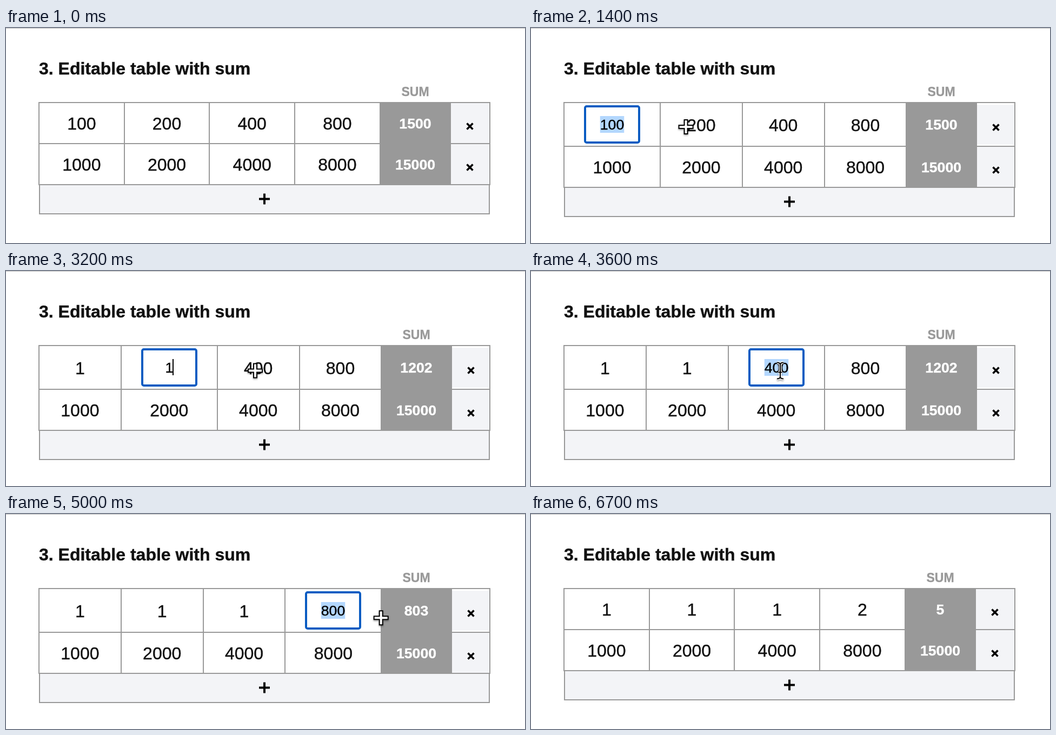
An HTML page that plays this animation: 960 px wide and 398 px high, repeating every 8 s.

```html
<!DOCTYPE html>
<html lang="en">
<head>
<meta charset="utf-8">
<title>Editable table with sum</title>
<style>
  html, body { margin: 0; width: 100%; height: 100%; overflow: hidden; background: #fff; }
  svg { display: block; font-family: "Liberation Sans", Arial, sans-serif; }
  text { fill: #111; stroke: #111; stroke-width: .4px; }
  .mid { text-anchor: middle; }
  .cell { font-size: 32px; }
  .field { font-size: 26.67px; fill: #000; stroke: #000; }
  .sum { font-size: 26.67px; font-weight: 700; fill: #fff; stroke: #fff; }
  .head { font-size: 23px; font-weight: 700; fill: #999; stroke: #999; }
  .title { font-size: 32px; font-weight: 700; }
  .line { fill: none; stroke: #000; }
  .halo { fill: none; stroke: #fff; }
  .cursor { filter: drop-shadow(0 2px 1.5px rgba(0, 0, 0, .35)); }
</style>
</head>
<body>
<svg id="stage" width="960" height="398" viewBox="0 0 960 398"></svg>
<script>
const LOOP = 8000, STEP = 100, BLINK = 500, CLOSE = 6700;
const LINE = '#999', PALE = '#f3f4f7', BLUE = '#0a5cc2', SELECT = '#b3d7fe';

// One edit per column: pointer leaves and arrives, field opens, digit is typed
const edits = [
  { leave: 0, arrive: 600, open: 1000, type: 2000, value: 1 },
  { leave: 1000, arrive: 1700, open: 2200, type: 3100, value: 1 },
  { leave: 2500, arrive: 3200, open: 3400, type: 4000, value: 1 },
  { leave: 4200, arrive: 4600, open: 4900, type: 5800, value: 2 }
];
const exit = { leave: 4900, arrive: 5600 };

const glides = [
  ...edits.map((e, i) => ({ ...e, x: 159 + 151 * i, y: 181 + 1.2 * i })),
  { ...exit, x: 896, y: 208 }
];
const entry = { x: -60, y: 228 };

const rect = (x, y, w, h, fill, more = '') =>
  `<rect x="${x}" y="${y}" width="${w}" height="${h}" fill="${fill}" ${more}/>`;
const text = (x, y, s, type) => `<text x="${x}" y="${y}" class="${type}">${s}</text>`;
const stroke = (d, width, type = 'line') =>
  `<path class="${type}" stroke-width="${width}" d="${d}"/>`;
const total = list => list.reduce((a, b) => a + b);
const easeOut = k => 1 - (1 - k) ** 2.2;

const beam = 'M-6-15Q0-15 0-11Q0-15 6-15M0-11V11M-6 15Q0 15 0 11Q0 15 6 15M-3.5 3H3.5';
const shapes = {
  arrow: '<path d="M0 0V26L6 20.5L10 30L14.5 28L10.5 19H18Z" stroke="#fff" stroke-width="2"/>',
  cell: stroke('M-14 0H14M0-14V14', 8) + stroke('M-12 0H12M0-12V12', 4, 'halo'),
  beam: stroke(beam, 5, 'halo') + stroke(beam, 2)
};

function pointer(t, field) {
  if (t > exit.arrive) return '';
  const i = glides.findLastIndex(g => t >= g.leave);
  const to = glides[i], from = glides[i - 1] || entry;
  const k = easeOut(Math.min(1, (t - to.leave) / (to.arrive - to.leave)));
  const x = from.x + (to.x - from.x) * k, y = from.y + (to.y - from.y) * k;
  let kind = x > 61 && x < 823 ? 'cell' : 'arrow';
  if (field && Math.abs(x - field) < 52) kind = 'beam';
  return `<g class="cursor" transform="translate(${x} ${y + 1})">${shapes[kind]}</g>`;
}

function input(mid, value, edit, t) {
  const w = String(value).length * 26.67 * .556;
  const typed = t >= edit.type;
  let s = rect(mid - 50, 145, 100, 67, '#fff', `rx="3" stroke="${BLUE}" stroke-width="4"`);
  if (!typed) s += rect(mid - w / 2, 163, w, 31, SELECT);
  s += text(mid, 187.5, value, 'field mid');
  if (typed && Math.floor((t - edit.type) / BLINK) % 2 === 0)
    s += rect(Math.round(mid + w / 2 - 1), 163, 2, 30, '#000');
  return s;
}

function draw(t) {
  const active = t < CLOSE ? edits.findLastIndex(e => t >= e.open) : -1;
  const open = active >= 0;
  const first = edits.map((e, i) => t >= e.type ? e.value : 100 * 2 ** i);
  const second = edits.map((e, i) => 1000 * 2 ** i);

  const cols = [61];
  for (let i = 0; i < 4; i++)
    cols.push(cols[i] + (!open ? 157.67 : i === active ? 178 : 151.8));
  const mids = edits.map((e, i) => (cols[i] + cols[i + 1]) / 2);
  const mid = open ? 219 : 214, low = mid + 76;
  const grey = open ? 693 : 691, side = grey + 132;
  const sumX = grey + 66, closeX = open ? 860 : 858;

  let s = rect(0, 0, 960, 1, '#bdbdbd') +
    text(61, 86, '3. Editable table with sum', 'title') +
    text(sumX, 126, 'SUM', 'head mid');

  // Add-row bar
  s += rect(62, low, 832, 54, PALE, `stroke="${LINE}" stroke-width="2"`) +
    stroke(`M468 ${low + 26.5}h20m-10-10v20`, 4);

  // Table body
  s += rect(61, 138, 834, low - 138, '#fff', `stroke="${LINE}" stroke-width="2"`);
  s += open ? rect(side, 142, 69, 74, PALE) : rect(side, 139, 71, 74, PALE);
  s += rect(side, mid + 1, open ? 69 : 71, 74, PALE);
  s += rect(61, mid - 1, 834, 2, LINE);
  for (const x of cols.slice(1, 4)) s += rect(Math.round(x) - 1, 138, 2, low - 138, LINE);
  s += rect(grey, 137, 132, low - 136, LINE);

  // Values, sums and remove marks
  mids.forEach((x, i) => {
    s += i === active ? input(Math.round(x), first[i], edits[i], t)
                      : text(x, open ? 191 : 188, first[i], 'cell mid');
    s += text(x, mid + 50, second[i], 'cell mid');
  });
  s += text(sumX, open ? 187.5 : 185.5, total(first), 'sum mid') +
    text(sumX, mid + 47.5, total(second), 'sum mid');
  for (const y of [open ? 184 : 182, mid + 44])
    s += stroke(`M${closeX - 5.5} ${y - 5.5}l11 11m0-11l-11 11`, 3.6);

  return s + pointer(t, open ? mids[active] : 0);
}

const stage = document.getElementById('stage');
const began = performance.now();
let shown = -1;
function frame() {
  const now = Math.max(0, performance.now() - began) % LOOP;
  const t = Math.floor(now / STEP) * STEP;
  if (t !== shown) stage.innerHTML = draw(shown = t);
  requestAnimationFrame(frame);
}
frame();
</script>
</body>
</html>
```
